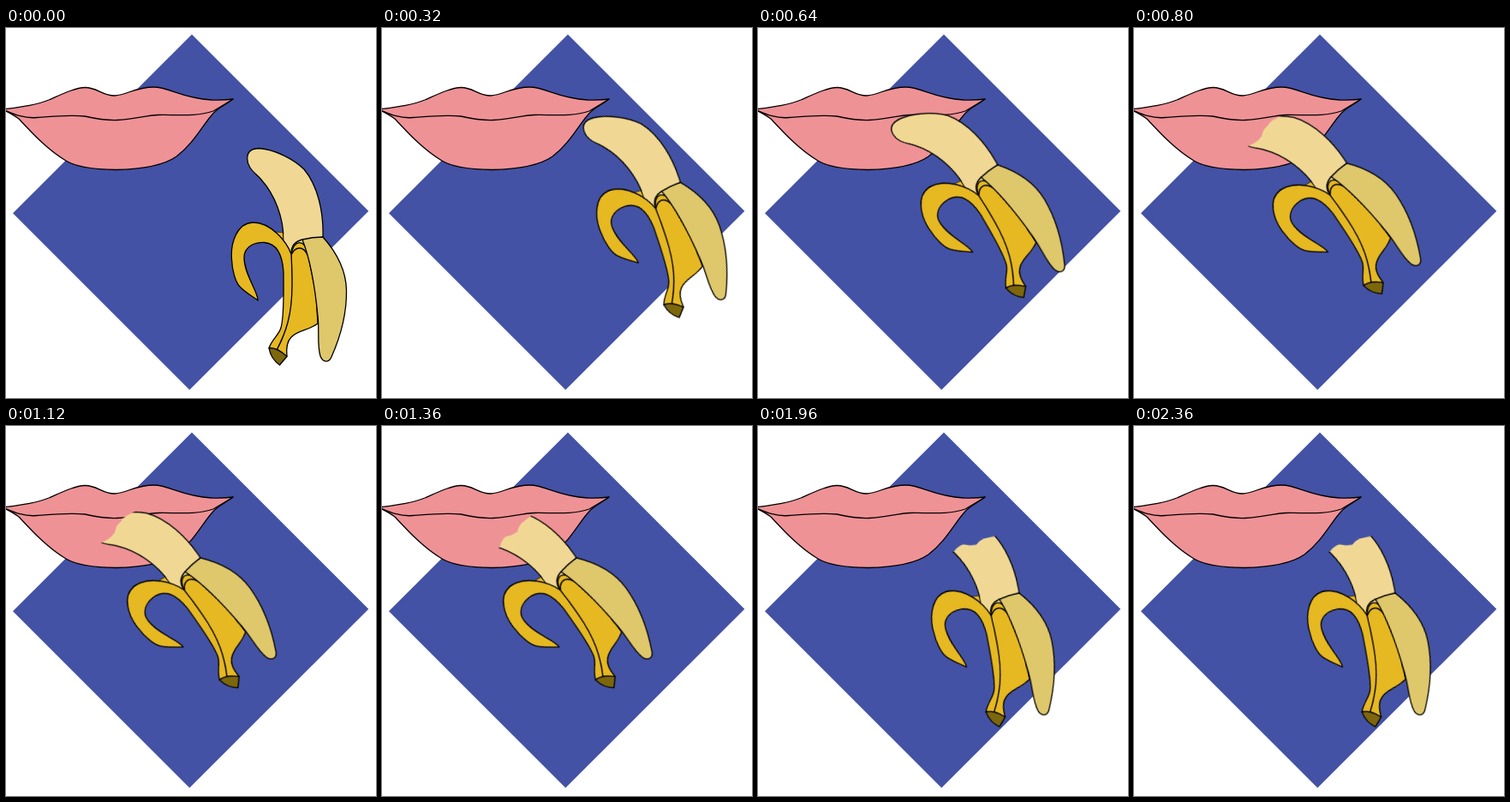
These frames come from a looping animation (432 px wide and 432 px high, 2.88 s). An HTML page:

```html
<!DOCTYPE html>
<html lang="en">
<head>
<meta charset="utf-8">
<title>Lips and banana</title>
<style>
html, body { margin: 0; width: 100%; height: 100%; overflow: hidden; background: #fff; }
svg { display: block; width: 100%; height: 100%; }
.ink { stroke: #000; stroke-width: 1.3; stroke-linejoin: round; stroke-linecap: round; }
.lip { fill: #ef9296; }
.peel { fill: #e6b822; }
.flap { fill: #dfc76c; }
.flesh { fill: #f0d894; }
.stem { fill: #7d670c; }
.line { fill: none; }

#banana { transform-origin: 330px 267px; animation: move 2880ms infinite; }
.whole, .bite1, .bite2 { animation: 2880ms step-end infinite; }
.whole { animation-name: whole; }
.bite1 { animation-name: bite1; }
.bite2 { animation-name: bite2; }

/* one step per 40 ms */
@keyframes move {
  0%      { transform: translate(0px, 0px) rotate(0deg); animation-timing-function: steps(10); }
  13.889% { transform: translate(-15.5px, -65.5px) rotate(-22.7deg); animation-timing-function: steps(9); }
  26.389% { transform: translate(-102.5px, -68.3px) rotate(-33.3deg); animation-timing-function: steps(1); }
  27.778% { transform: translate(-102px, -67.8px) rotate(-33.7deg); animation-timing-function: steps(8); }
  38.889%, 47.222% { transform: translate(-122.7px, -71.3px) rotate(-34.8deg); animation-timing-function: steps(9); }
  59.722%, 100% { transform: translate(-60.3px, -42.2px) rotate(-10.3deg); }
}
@keyframes whole { 0% { opacity: 1; } 27.778%, 100% { opacity: 0; } }
@keyframes bite1 { 0% { opacity: 0; } 27.778% { opacity: 1; } 43.056%, 100% { opacity: 0; } }
@keyframes bite2 { 0% { opacity: 0; } 43.056%, 100% { opacity: 1; } }
</style>
</head>
<body>
<svg viewBox="0 0 432 432">
  <defs>
    <path id="flesh" class="ink flesh" d="M324 247C324 221 314 195 298 177C291 169 282 164 281.700 153C281.500 144 287 140.500 296 140.500C314 142 336 153 348 165C364 184 371 215 370 244"/>
    <clipPath id="cut1"><path d="M270 166L286 163.500Q297 166 305 162.500Q311 156 317 156.500Q324 153 330 154.700L340 156L390 150V280H270Z"/></clipPath>
    <clipPath id="cut2"><path d="M280 186L304 182.500Q310 177 316 176.500Q324 180 331 179.500Q337 174 343 174L355 173.500L390 170V280H280Z"/></clipPath>
  </defs>

  <path fill="#4352a4" d="M217 7.500L423.300 213.700L214.300 422.500L8 216.300Z"/>

  <path class="ink lip" d="M-4 95C18 92 35 90 50 84C66 77 80 70 92 69.500C106 69 112 79 127 79C142 78 150 69 173 69C190 69 205 82 240 84Q255 84.500 265 83C255 91 247 93 240 102C230 113 219 135 199 150C182 162 155 165 128 165.500C95 165 80 161 70 155C48 142 30 122 15 106Q8 101 -4 95Z"/>
  <path class="ink line" d="M-4 95C8 100 20 106 36 104.500C55 103 75 101 92 103C105 106 115 108 130 107.500C150 107 162 102 178 101.500C198 101 222 104 242 97Q254 90 265 83"/>

  <g id="banana">
    <path class="peel" stroke="#000" stroke-width=".6" d="M315 238L324 239L325 249Z"/>
    <g class="whole"><use href="#flesh"/></g>
    <g class="bite1"><use href="#flesh" clip-path="url(#cut1)"/></g>
    <g class="bite2"><use href="#flesh" clip-path="url(#cut2)"/></g>
    <path class="flesh" d="M324.500 240L369 240L346 252L333 264L324.500 248Z"/>
    <path class="ink peel" d="M333 264C334 300 337 338 316 376L328 383.500C327 374 328 366 333 361C340 353 354 353 364 345L362 310L352 262C348 247 337 246 333 264Z"/>
    <path class="ink line" d="M333.500 264C338 255 347 254 352 265"/>
    <path class="ink peel" d="M333 264C328 250 310 227 288 227C270 228 262 250 263.500 270C264 283 268 298 274 303C280 309 287 313 294 318C295 309 278 288 278 268C278 255 290 250 302 250.500C318 252 323 268 324 285C324 310 325 336 321 350C319 358 310 364 307 374L316 376C327 355 334 335 334 300Q334 280 333 264Z"/>
    <path class="ink flap" d="M346 247Q358 244 370 244C386 262 397 283 397.500 306C398 336 388 366 380 384C377 391 370 391 367 383C363 371 366 352 364 336C361 305 356 272 346 247Z"/>
    <path class="ink line" d="M333 263C333 254 338 249 346 247"/>
    <path class="ink stem" d="M307 373.500Q317 373 328 383.500L319.500 393.500Q309 386 307 373.500Z"/>
  </g>
</svg>
</body>
</html>
```
